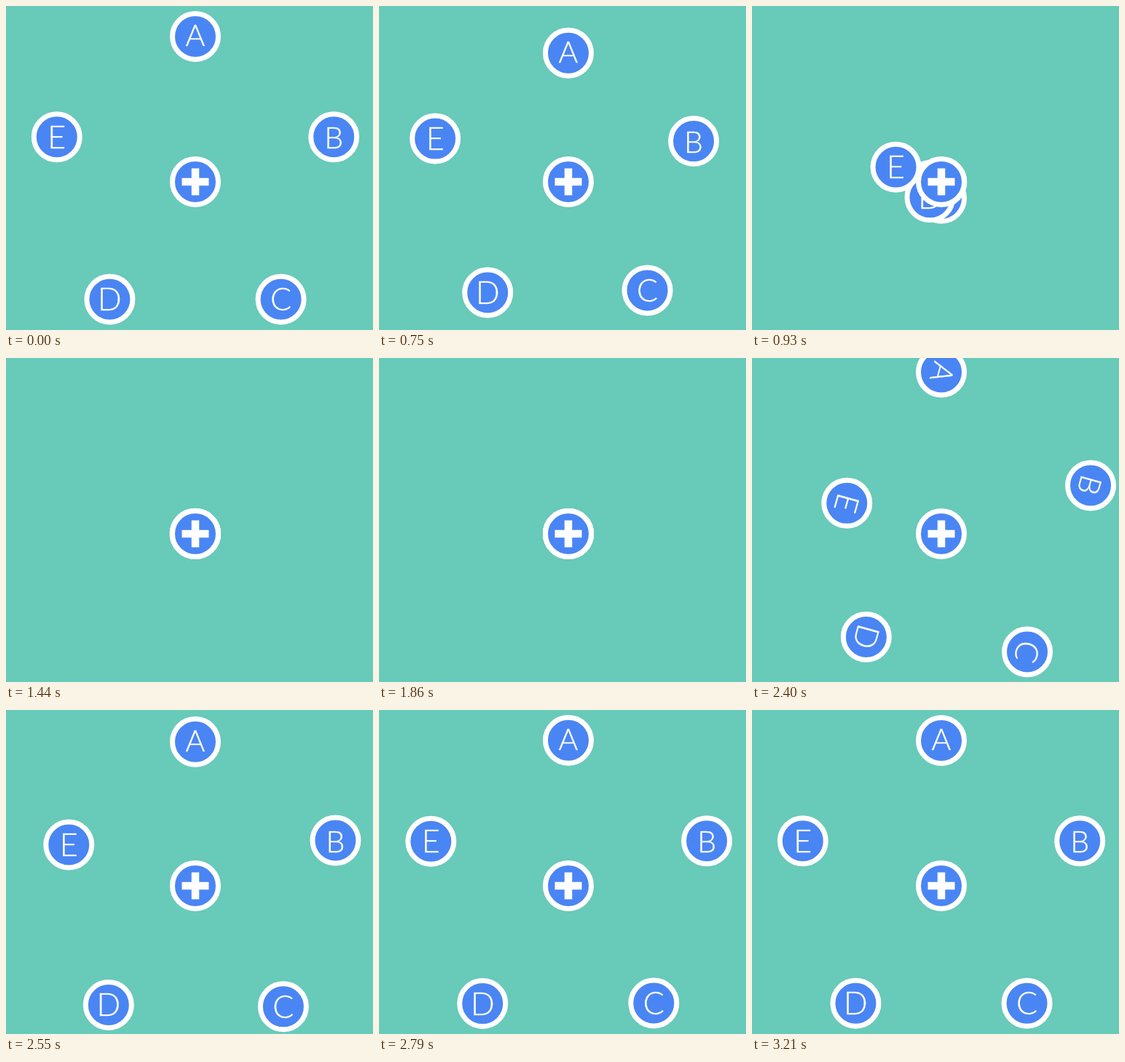
An HTML page that plays this animation: 504 by 446 pixels, repeating every 3.24 s.

```html
<!DOCTYPE html>
<html lang="en">
<head>
<meta charset="utf-8">
<title>Radial menu</title>
<style>
  html, body { margin: 0; width: 100%; height: 100%; overflow: hidden; background: #68cab8; }
  svg { display: block; width: 504px; height: 446px; }
  circle { fill: #4a85f4; stroke: #fff; stroke-width: 7; }
  text { font: 300 42px Lato, "Open Sans", sans-serif; fill: #fff; stroke: #fff; stroke-width: .4; text-anchor: middle; }
  path { fill: none; stroke: #fff; stroke-width: 10.5; }
</style>
</head>
<body>
<svg viewBox="0 0 504 446">
  <g id="items"></g>
  <g transform="translate(260 242)">
    <circle r="31.5"/>
    <path d="M-18.5 0H18.5M0 -18.5V18.5"/>
  </g>
</svg>
<script>
const LOOP = 3240, STEP = 30;
const CLOSE_AT = 722, OPEN_AT = 2188, SPIN_TIME = 300;
const RADIUS = 200, FRICTION = 21.5;
const CENTER = { x: 260, y: 242 };

// Nudge: vertical offset of the letter inside its circle
const items = [
  { letter: 'A', nudge: -1.5, size: 41 },
  { letter: 'B', nudge: 1.5, size: 41 },
  { letter: 'C', nudge: 0, size: 43 },
  { letter: 'D', nudge: 0, size: 43 },
  { letter: 'E', nudge: 0, size: 43 },
];

function create(name, attributes, parent) {
  const node = document.createElementNS('http://www.w3.org/2000/svg', name);
  for (const key in attributes) node.setAttribute(key, attributes[key]);
  return parent.appendChild(node);
}

items.forEach((item, i) => {
  item.angle = i * Math.PI * 2 / items.length;
  item.tension = 360 - 60 * i;
  item.node = create('g', {}, document.getElementById('items'));
  create('circle', { r: 31.5 }, item.node);
  item.label = create('text', {
    y: item.nudge + item.size * 0.358,
    style: `font-size:${item.size}px`,
  }, create('g', {}, item.node));
  item.label.textContent = item.letter;
});

// Unit step response of an underdamped spring released from rest
function spring(ms, tension) {
  const t = ms / 1000, decay = FRICTION / 2;
  const frequency = Math.sqrt(tension - decay * decay);
  const phase = frequency * t;
  return 1 - Math.exp(-decay * t) * (Math.cos(phase) + decay / frequency * Math.sin(phase));
}

function openness(time, tension) {
  if (time < CLOSE_AT) return 1;
  if (time < OPEN_AT) return 1 - spring(time - CLOSE_AT, tension);
  return spring(time - OPEN_AT, tension);
}

function draw(time) {
  const spin = Math.min(1, Math.max(0, (time - OPEN_AT) / SPIN_TIME)) * -360;
  for (const { node, label, angle, tension } of items) {
    const distance = RADIUS * openness(time, tension);
    const x = CENTER.x + distance * Math.sin(angle);
    const y = CENTER.y - distance * Math.cos(angle);
    node.setAttribute('transform', `translate(${x} ${y})`);
    label.parentNode.setAttribute('transform', `rotate(${spin})`);
  }
}

const start = performance.now();
function tick() {
  const time = (performance.now() - start) % LOOP;
  draw(Math.floor(time / STEP) * STEP);
  requestAnimationFrame(tick);
}
tick();
</script>
</body>
</html>
```
